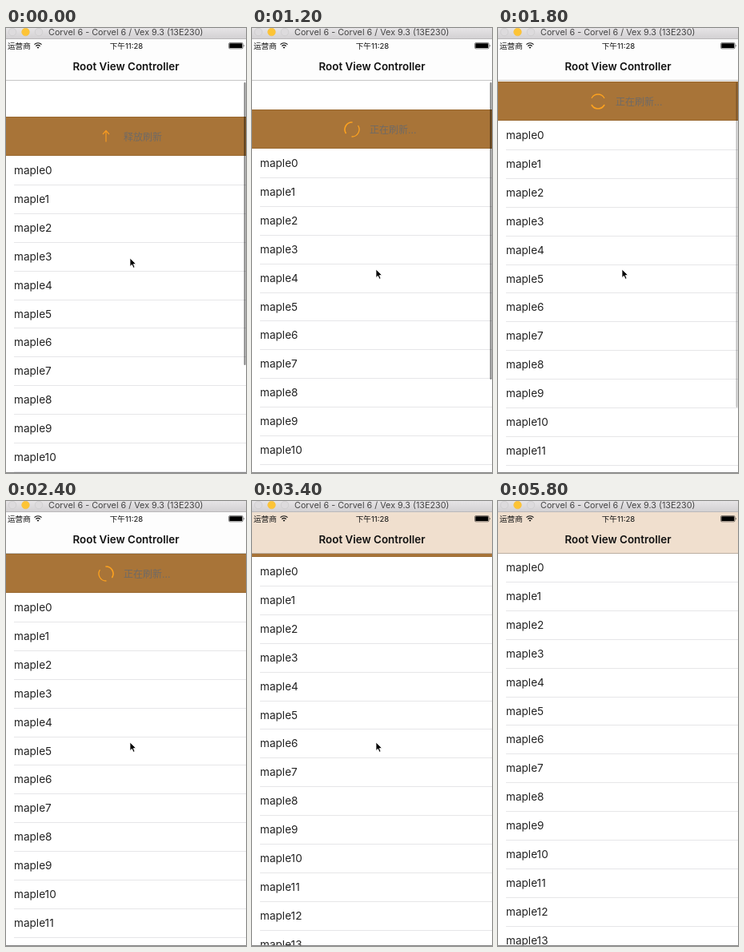
Recreate the animation shown at these times as an HTML page. Size 300 px wide and 557 px high, loop 6000 ms.

```html
<!DOCTYPE html>
<html lang="zh">
<head>
<meta charset="utf-8">
<title>Pull to refresh</title>
<style>
  html, body { margin: 0; width: 100%; height: 100%; overflow: hidden; background: #fff; }
  svg { display: block; width: 100%; height: 100%; }
  text { font-family: Inter, "Noto Sans CJK SC", "Noto Sans CJK", sans-serif; }
  .row { font-size: 13.6px; fill: #222; }
  .status { font-size: 9.6px; fill: #111; }
</style>
</head>
<body>
<svg viewBox="0 0 300 557">
  <defs>
    <linearGradient id="chrome" x2="0" y2="1">
      <stop offset="0" stop-color="#e6e4e6"/>
      <stop offset="1" stop-color="#d2d0d2"/>
    </linearGradient>
    <filter id="soft" x="-50%" y="-50%" width="200%" height="200%">
      <feGaussianBlur stdDeviation="6"/>
    </filter>
    <clipPath id="navClip"><rect y="14" width="300" height="52"/></clipPath>
  </defs>
  <rect width="300" height="557" fill="#fff"/>

  <g id="band">
    <rect width="300" height="49" fill="#a87438"/>
    <path d="M0 .5H300M0 48.5H300" stroke="#99682f"/>
    <path id="arrow" d="M125 31.5V18M121 22l4-4.5l4 4.5" fill="none" stroke="#f79a20" stroke-width="1.2"/>
    <g id="spinner" fill="none" stroke="#fda21f" stroke-linecap="round">
      <path id="arcA" stroke-width="1.6"/>
      <path id="arcB" stroke-width="1.3"/>
    </g>
    <text id="label" x="147" y="29.5" font-size="12" fill="#6f6a66"></text>
  </g>
  <g id="rows"></g>
  <rect id="bar" x="297.5" y="68" width="2" rx="1" fill="#000" fill-opacity=".5"/>

  <rect y="14" width="300" height="52" fill="#fdfdfd"/>
  <g clip-path="url(#navClip)">
    <rect id="tint" x="-40" width="380" fill="#f0dfce" filter="url(#soft)"/>
  </g>
  <path d="M0 65.5H300" stroke="#000" stroke-opacity=".22"/>
  <text x="150" y="53" text-anchor="middle" font-size="13.4" font-weight="600" fill="#111">Root View Controller</text>

  <text class="status" x="2" y="26">运营商</text>
  <g fill="none" stroke="#111" stroke-width="1.2">
    <path d="M35.5 20.6a6.4 6.4 0 0 1 9 0M37.4 22.7a3.8 3.8 0 0 1 5.2 0"/>
  </g>
  <path d="M38.6 24.2a2 2 0 0 1 2.8 0L40 25.8z" fill="#111"/>
  <text class="status" x="150.5" y="26" text-anchor="middle">下午11:28</text>
  <rect x="278.5" y="18.5" width="17.6" height="7.4" rx="1.4" fill="none" stroke="#000" stroke-width=".5"/>
  <rect x="279.3" y="19.3" width="16" height="5.8" rx=".6" fill="#000"/>
  <path d="M297.2 20.8q1.3 1.4 0 2.8z" fill="#000"/>

  <rect width="300" height="14" fill="url(#chrome)"/>
  <path d="M0 13.5H300" stroke="#bab8ba"/>
  <g stroke-width=".7">
    <circle cx="8" cy="5" r="4.8" fill="#dddbdd" stroke="#cccacc"/>
    <circle cx="24.5" cy="5" r="4.8" fill="#fdc435" stroke="#f6c044"/>
    <circle cx="41" cy="5" r="4.8" fill="#dddbdd" stroke="#cccacc"/>
  </g>
  <text x="53" y="9.2" font-size="10.8" fill="#444">Corvel 6 - Corvel 6 / Vex 9.3 (13E230)</text>
  <path d="M0 556.5H300" stroke="#858585"/>
  <path id="cursor" d="M0 0V10.5L2.4 8.3L4.2 12.3L6 11.5L4.3 7.6H7.6Z" fill="#000" stroke="#fff" stroke-width=".8"/>
</svg>
<script>
  const LOOP = 6000, STEP = 200;
  const NAV = 66, BAND = 49, PITCH = 35.9;
  const RELEASE = 1000, CLOSE = 2820;
  const NS = "http://www.w3.org/2000/svg";
  const $ = id => document.getElementById(id);
  const set = (el, attrs) => {
    for (const key in attrs) el.setAttribute(key, attrs[key]);
    return el;
  };
  const add = (tag, attrs) => $("rows").appendChild(set(document.createElementNS(NS, tag), attrs));
  const clamp = x => Math.min(1, Math.max(0, x));

  const rows = Array.from({ length: 14 }, (_, i) => {
    const text = add("text", { class: "row", x: 10 });
    text.textContent = "maple" + i;
    return { text, line: add("rect", { x: 10, width: 290, height: 1, fill: "#e6e6e8" }) };
  });

  function arc(from, to) {
    const point = deg => {
      const a = deg * Math.PI / 180;
      return `${9 * Math.cos(a)} ${9 * Math.sin(a)}`;
    };
    return `M${point(from)}A9 9 0 0 1 ${point(to)}`;
  }
  set($("arcA"), { d: arc(-130, -10) });
  set($("arcB"), { d: arc(50, 170) });

  // Fraction of the distance left, some time after letting go
  const fall = ms => Math.exp(-0.37 * Math.pow(Math.max(0, ms) / STEP, 1.74));

  function bandTop(t) {
    if (t <= RELEASE) return 111 + 7 * clamp(t / 600);
    if (t <= CLOSE) return NAV + 52 * fall(t - RELEASE);
    // The list rests with its edge under the bar's hairline
    const travel = BAND + 1;
    return NAV - travel + travel * fall(t - CLOSE);
  }

  // Time, x, y
  const path = [[0, 155, 288], [600, 155, 302], [4000, 155, 302], [4200, 141, 252],
                [4400, 114.5, 160], [4600, 96, 38], [4800, 88, 4]];

  function cursorAt(t) {
    const i = path.findIndex(p => p[0] >= t);
    if (i <= 0) return path[0].slice(1);
    const [a, b] = [path[i - 1], path[i]];
    const k = (t - a[0]) / (b[0] - a[0]);
    return [a[1] + (b[1] - a[1]) * k, a[2] + (b[2] - a[2]) * k];
  }

  function draw(time) {
    const t = Math.floor((time % LOOP) / STEP) * STEP;
    const top = Math.round(bandTop(t)), bottom = top + BAND;
    const loading = t > RELEASE;

    set($("band"), { transform: `translate(0 ${top})` });
    set($("arrow"), { visibility: loading ? "hidden" : "visible" });
    set($("spinner"), {
      visibility: loading ? "visible" : "hidden",
      transform: `translate(125 25) rotate(${(t - 1400) / STEP * 80})`
    });
    $("label").textContent = loading ? "正在刷新..." : "释放刷新";

    rows.forEach(({ text, line }, i) => {
      set(text, { y: bottom + 23 + PITCH * i });
      set(line, { y: Math.round(bottom + PITCH * (i + 1)) });
    });

    // The bar's backdrop spreads the band's colour as it slides under
    const cover = clamp((NAV - top) / BAND);
    set($("tint"), { y: top - 16 * cover, height: cover ? 110 - top : 0 });

    const end = (loading ? 476 : 467) - (top - NAV);
    set($("bar"), { height: Math.max(0, end - 68), opacity: 1 - clamp((t - 1400) / 800) });

    const shown = t <= 4800;
    set($("cursor"), { visibility: shown ? "visible" : "hidden" });
    if (shown) set($("cursor"), { transform: `translate(${cursorAt(t).join(" ")})` });
  }

  const start = performance.now();
  function tick() {
    draw(performance.now() - start);
    requestAnimationFrame(tick);
  }
  tick();
</script>
</body>
</html>
```
